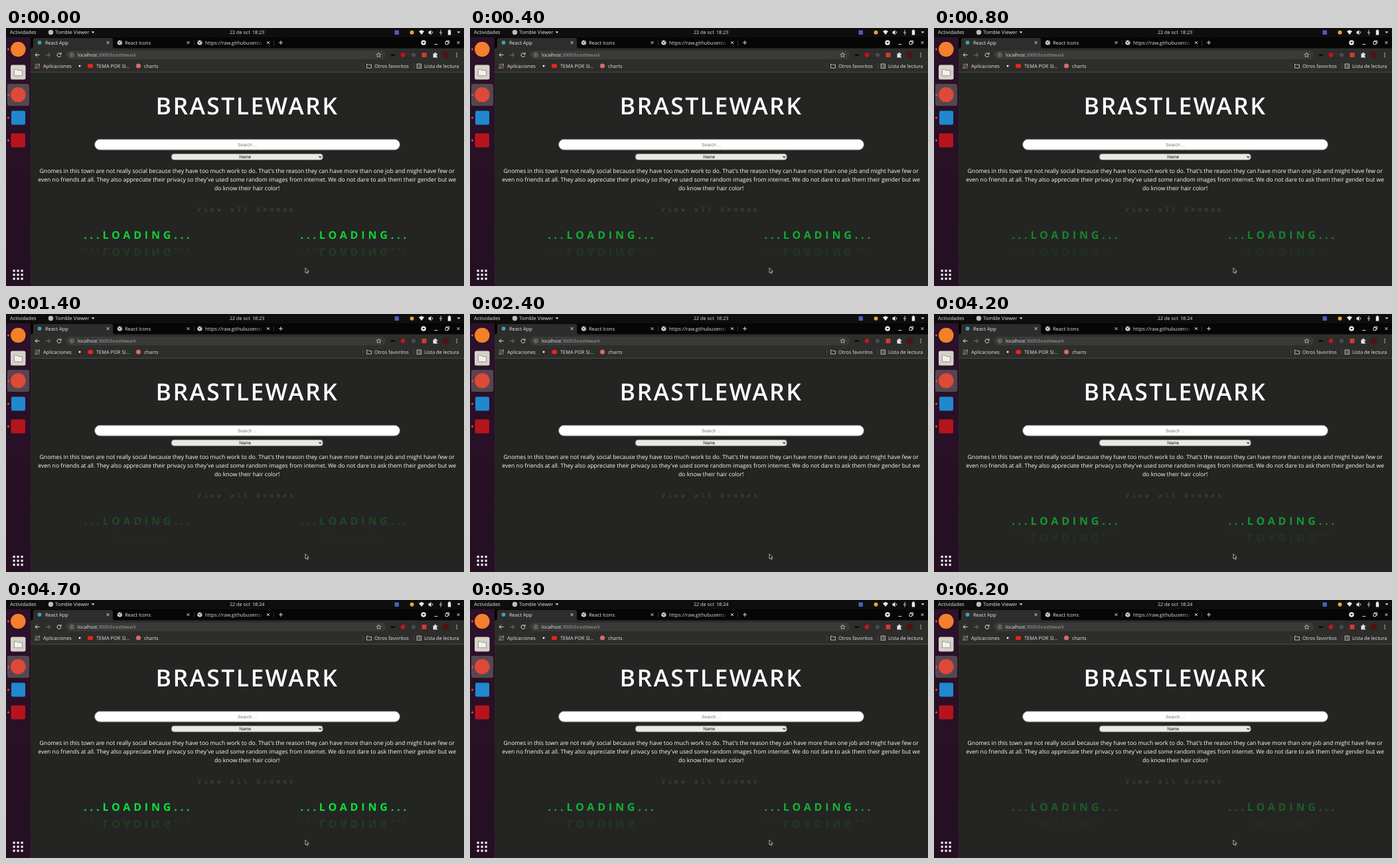
An HTML page for the animation above (6.3 s loop, 690x388 px).

```html
<!DOCTYPE html>
<html lang="es">
<head>
<meta charset="utf-8">
<title>Brastlewark</title>
<style>
  html, body { margin: 0; width: 100%; height: 100%; overflow: hidden; background: #242522; }
  svg { display: block; }
  text { font-family: "Open Sans", "Noto Sans", sans-serif; font-size: 7.45px; fill: #e8e8e8;
         text-rendering: geometricPrecision; white-space: pre; }
  .mid { text-anchor: middle; }
  .bar { font-size: 7.5px; }
  .clock { font-size: 7.2px; }
  .url { font-size: 7px; }
  .form { font: 6.8px "Liberation Sans", Arial, sans-serif; }
  .title { font-size: 35.5px; font-weight: 600; letter-spacing: 2.4px; fill: #fff; }
  .body { font-size: 8.63px; fill: #fff; }
  .link { font: 9px "DejaVu Sans Mono", monospace; letter-spacing: 4.5px; fill: #4a4b47; }
  .loading { font-size: 16px; font-weight: 700; letter-spacing: 4.85px; fill: #09ee3c; }
  .line { fill: none; stroke: #dcdcdc; stroke-width: 1; }
</style>
</head>
<body>
<svg width="690" height="388" viewBox="0 0 690 388">
  <defs>
    <linearGradient id="dock" x2="0" y2="1">
      <stop stop-color="#2c112a"/><stop offset="1" stop-color="#240f23"/>
    </linearGradient>
    <linearGradient id="tabFade" gradientUnits="userSpaceOnUse" x1="377" x2="388">
      <stop stop-color="#dcdcdc"/><stop offset="1" stop-color="#dcdcdc" stop-opacity="0"/>
    </linearGradient>
    <g id="globe">
      <circle r="3.6" fill="#e6e6e6"/>
      <path d="M-2.6-1.5L0-.4-.8 1.8M1-2.8l.6 1.6 1.5.4M1.2 1l1 1.2" fill="none" stroke="#222"/>
    </g>
    <path id="cross" class="line" d="M-2-2L2 2M2-2L-2 2"/>
    <path id="caret" d="M-2.5-1.2h5L0 1.6z" fill="#ddd"/>
    <g id="loader">
      <text class="loading">...LOADING...</text>
      <text class="loading" transform="translate(0 14.6) scale(1 -1)" opacity=".13">...LOADING...</text>
    </g>
  </defs>

  <!-- desktop bar -->
  <rect width="690" height="14" fill="#0e0e0e"/>
  <text class="bar" x="6" y="9.3">Actividades</text>
  <circle cx="67.5" cy="6.5" r="3.7" fill="#bdbdbd"/>
  <text class="bar" x="74" y="9.3">Tomble Viewer</text>
  <use href="#caret" x="131" y="6.5"/>
  <text class="clock" x="337" y="9.3">22 de oct</text>
  <text class="clock" x="371" y="9.3" id="clock">18:23</text>
  <rect x="585.5" y="3.5" width="6.5" height="6.5" fill="#5059c9"/>
  <circle cx="611.5" cy="6.7" r="3" fill="#eda03a"/>
  <path d="M622 5Q626 1.5 630 5L626 10z" fill="#eee"/>
  <path d="M636.5 5h1.7l2.3-2v7.4l-2.3-2h-1.7z" fill="#eee"/>
  <path class="line" d="M642 4.8q1.4 1.8 0 3.7M655 3v4M653.2 6q1.8 4 3.6 0M655 8.5v2"/>
  <path d="M665.8 3.5h1.2V2.5h2v1h1.2v7h-4.4z" fill="#eee"/>
  <use href="#caret" x="682" y="6.5"/>

  <!-- dock -->
  <rect y="14" width="37" height="374" fill="url(#dock)"/>
  <rect x="2" y="84" width="33" height="33" rx="3" fill="#56464f"/>
  <circle cx="18.3" cy="32" r="11.3" fill="#f4802c"/>
  <rect x="7" y="55.5" width="22.5" height="22" rx="2.5" fill="#d5d2ca"/>
  <path d="M12.5 62h4l1.5 1.8h6.5v8h-12z" fill="#f4f2ed" stroke="#98958d"/>
  <circle cx="18.3" cy="100.3" r="11.3" fill="#dd4a38"/>
  <rect x="8" y="124.5" width="21" height="21" rx="2" fill="#2088cf"/>
  <rect x="7.5" y="158.5" width="21.5" height="21" rx="2" fill="#b5141d"/>
  <g fill="#e2562c" id="running"></g>
  <g id="launcher"></g>

  <!-- browser -->
  <rect x="37" y="14" width="653" height="17" fill="#060606"/>
  <path d="M37 31q4 0 4-4v-9q0-3 3-3h114q3 0 3 3v9q0 4 4 4z" fill="#2d2d2b"/>
  <rect x="37" y="30.5" width="653" height="36.5" fill="#2d2d2b"/>
  <rect x="37" y="66.2" width="653" height=".8" fill="#51514f"/>
  <circle cx="50.5" cy="22" r="3" fill="#3f9fb3"/>
  <text x="59" y="24.7">React App</text>
  <use href="#globe" x="171.5" y="22"/>
  <text x="179" y="24.7">React Icons</text>
  <use href="#globe" x="292" y="22"/>
  <text x="300" y="24.7" style="fill:url(#tabFade)">https://raw.githubuserco</text>
  <use href="#cross" x="153.5" y="22"/>
  <use href="#cross" x="274.5" y="22"/>
  <use href="#cross" x="395" y="22"/>
  <path class="line" d="M283.5 18v8M403.5 18v8" style="stroke:#4a4b4f;stroke-width:.6"/>
  <path class="line" d="M414 19v6M411 22h6M645.5 24.5h5M662 20.5h4v4h-4zM663.5 20.5v-1.5h4v4H666"/>
  <circle cx="629" cy="22" r="3.8" fill="#e6e6e6"/>
  <path d="M627 21h4l-2 2.5z" fill="#111"/>
  <use href="#cross" x="681.5" y="22"/>

  <path class="line" d="M50.5 40.5h-6.5M47 37.5l-3 3 3 3"/>
  <path class="line" d="M60 40.5h6.5M63.5 37.5l3 3-3 3" style="stroke:#77787b"/>
  <path class="line" d="M82.5 38.8a3 3 0 1 0 .4 2.6M83 37v2.5h-2.5"/>
  <rect x="90" y="34" width="482" height="13" rx="6.5" fill="#3a3a38"/>
  <circle class="line" cx="99" cy="40.5" r="2.9" style="stroke-width:.7;stroke:#aaa"/>
  <path class="line" d="M99 40v2M99 38.6v.7" style="stroke-width:.8"/>
  <text class="url" x="108" y="43">localhost<tspan fill="#a3a5a6">:3000/brastlewark</tspan></text>
  <path class="line" d="M561.5 37l1 2.3 2.5.2-1.9 1.7.6 2.5-2.2-1.4-2.2 1.4.6-2.5-1.9-1.7 2.5-.2z" style="stroke-width:.7"/>
  <rect x="579.5" y="39.3" width="7" height="2.6" rx="1" fill="#0e0e0e"/>
  <circle cx="598" cy="40.5" r="3.4" fill="#c5121b"/>
  <circle cx="614" cy="40.5" r="3" fill="#4c4c4a"/>
  <rect x="626.5" y="37" width="7" height="7" fill="#d23a31"/>
  <path d="M643.5 38.5h2q0-2 1.2-2t1.2 2h2v2q-1.4 0-1.4 1.2t1.4 1.2v1.6h-6.4z" fill="#e4e4e4"/>
  <circle cx="662.5" cy="40.5" r="5" fill="#501316"/>
  <g fill="#ddd"><circle cx="679" cy="38" r=".8"/><circle cx="679" cy="40.6" r=".8"/><circle cx="679" cy="43.2" r=".8"/></g>

  <g id="apps"></g>
  <text x="56" y="59.8">Aplicaciones</text>
  <circle cx="111" cy="57" r="1.5" fill="#eee"/>
  <rect x="123.3" y="54.2" width="7.6" height="5.8" rx="1.3" fill="#e8261d"/>
  <text x="136" y="59.8">TEMA POR SI…</text>
  <circle cx="199.5" cy="57" r="3.6" fill="#d96a62"/>
  <text x="208" y="59.8">charts</text>
  <path class="line" d="M537.5 53v8" style="stroke:#55565a;stroke-width:.6"/>
  <path class="line" d="M543.5 54.5h2.5l1 1h3.5v4.7h-7z" style="stroke-width:.8"/>
  <text x="555" y="59.8">Otros favoritos</text>
  <path class="line" d="M614.5 53v8" style="stroke:#55565a;stroke-width:.6"/>
  <path class="line" d="M619 54h6.5v6.5H619zM620.3 56h1M622 56h2.3M620.3 58.3h1M622 58.3h2.3" style="stroke-width:.8"/>
  <text x="630" y="59.8">Lista de lectura</text>

  <!-- page -->
  <text class="title mid" x="363.4" y="129.9">BRASTLEWARK</text>
  <rect x="133.6" y="167.4" width="459.8" height="15.8" rx="7.9" fill="#fff" stroke="#858682"/>
  <text class="form mid" x="363.5" y="177.6" style="fill:#757575">Search ...</text>
  <rect x="249.3" y="189.3" width="228" height="9" rx="4" fill="#e9e9e6" stroke="#858682" stroke-width=".6"/>
  <text class="form mid" x="360.3" y="196.2" style="fill:#111">Name</text>
  <path d="M471.3 192.8l2 2 2-2" fill="none" stroke="#111" stroke-width="1.1"/>
  <text class="body mid" x="363.2" y="218.3">Gnomes in this town are not really social because they have too much work to do. That's the reason they can have more than one job and might have few or</text>
  <text class="body mid" x="363.2" y="231.3">even no friends at all. They also appreciate their privacy so they've used some random images from internet. We do not dare to ask them their gender but we</text>
  <text class="body mid" x="363.2" y="244.3">do know their hair color!</text>
  <text class="link" x="288.5" y="276">View all Gnomes</text>
  <g id="loaders">
    <use href="#loader" x="117.2" y="316.7"/>
    <use href="#loader" x="443.6" y="316.7"/>
  </g>
  <path d="M451 360.8v7.4l1.7-1.5 1.2 2.6 1.3-.6-1.2-2.5h2.3z" fill="#111" stroke="#eee" stroke-width=".7"/>
</svg>
<script>
  const $ = id => document.getElementById(id);
  const LOOP = 6300, PEAK = 4750;

  // 3 x 3 grid of squares
  const grid = (x, y, step, size, color) => Array.from({ length: 9 }, (_, i) =>
    `<rect x="${x + i % 3 * step}" y="${y + Math.floor(i / 3) * step}" width="${size}" height="${size}" fill="${color(i)}"/>`).join('');
  $('launcher').innerHTML = grid(10.5, 363.5, 6, 3.2, () => '#f2f2f2');
  $('apps').innerHTML = grid(43.8, 53.8, 2.6, 1.8, i => ['#e4493c', '#4a9f5b', '#e8b53a', '#4b86e0'][i % 4]);
  $('running').innerHTML = [32, 101, 135, 169].map(y => `<circle cx="3.5" cy="${y}" r="1.5"/>`).join('');

  // linear two-second fade out, dark pause, accelerating fade in
  function glow(t) {
    if (t >= PEAK) return 1 - (t - PEAK) / 2000;
    if (t < 2900) return Math.max(0, 0.875 - t / 2000);
    return ((t - 2900) / (PEAK - 2900)) ** 1.6;
  }

  function draw() {
    const t = Math.floor(performance.now() % LOOP / 100) * 100;
    $('loaders').setAttribute('opacity', glow(t));
    $('clock').textContent = t < 4100 ? '18:23' : '18:24';
    requestAnimationFrame(draw);
  }
  draw();
</script>
</body>
</html>
```
